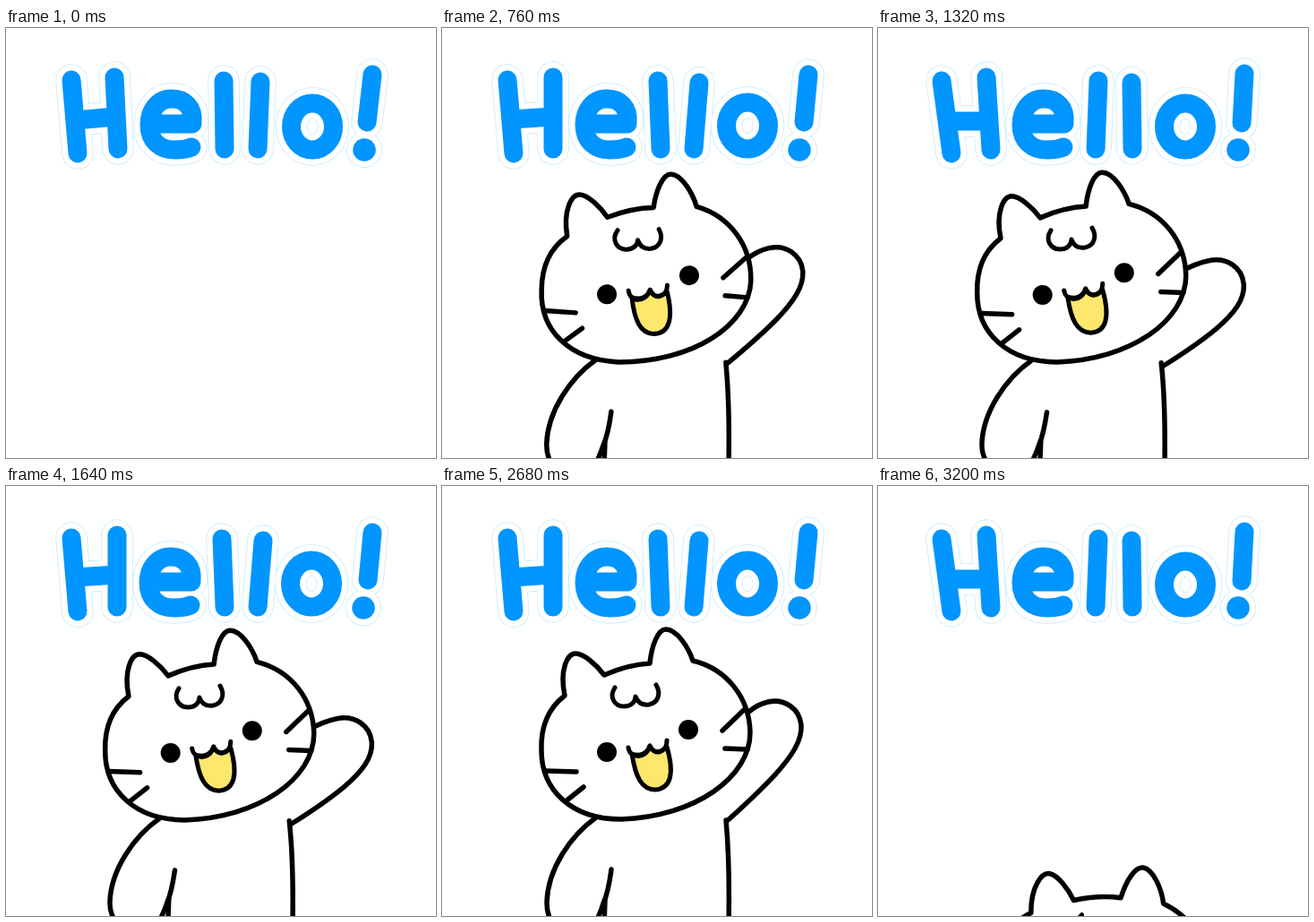
Write an HTML page with a canvas that moves like this. It is 480 px wide and 480 px high and loops after 3240 ms.

```html
<!DOCTYPE html>
<html lang="en">
<head>
<meta charset="utf-8">
<title>Hello</title>
<style>
html, body { margin: 0; height: 100%; overflow: hidden; background: #fff; }
canvas { display: block; }
</style>
</head>
<body>
<canvas id="stage" width="480" height="480" aria-label="A white cat waves hello"></canvas>
<script>
const ctx = document.getElementById('stage').getContext('2d');
const LOOP = 3240, BLUE = '#0095ff', MAX_TILT = 11.3;
ctx.lineCap = ctx.lineJoin = 'round';

// Three wobbling versions of the lettering
const lettering = [
  ['M73 58L80 140M121 55L125 135M78 103L122 99', 0, 'M243 59L244 135M284 60L281 135', 342, 110, 'M409 52L403 105', 400, 136],
  ['M73 58L80 140M124 55L124 135M78 102L123 99', -1, 'M241 59L244 135M287 61L281 135', 341, 109, 'M409 52L404 105', 399, 136],
  ['M71 59L82 140M121 55L126 136M77 104L124 104', 0, 'M246 59L243 135M283 61L284 135', 343, 110, 'M409 51L406 106', 402, 136]
].map(([h, ex, ll, ox, oy, bang, dotX, dotY]) => {
  const letters = new Path2D(h + ll + bang), dot = new Path2D(`M${dotX} ${dotY}h.01`);
  const e = new Path2D('M166 107L208 107C210 88 199 79 185 79C169 79 160 93 160 108C160 126 172 136 188 136C197 136 203 135 207 133');
  letters.addPath(e, { e: ex });
  letters.moveTo(ox + 23.5, oy);
  letters.ellipse(ox, oy, 23.5, 26, 0, 0, 7);
  return { letters, dot };
});

function drawText({ letters, dot }) {
  for (const [color, width] of [['#c8ebfd', 35.4], ['#fff', 33.8], [BLUE, 21]]) {
    ctx.strokeStyle = color;
    ctx.lineWidth = width;
    ctx.stroke(letters);
    ctx.lineWidth = width + 4.5;
    ctx.stroke(dot);
  }
}

// Blend the numbers of two paths with the same commands
function mix(a, b, p) {
  const to = b.match(/-?\d+/g);
  let i = 0;
  return a.replace(/-?\d+/g, n => +n + (to[i++] - n) * p);
}

function ink(path, fill, width = 5.5) {
  const shape = new Path2D(path);
  if (fill) {
    ctx.fillStyle = fill;
    ctx.fill(shape);
  }
  ctx.strokeStyle = '#000';
  ctx.lineWidth = width;
  ctx.stroke(shape);
}

function rotate(degrees, x, y) {
  ctx.translate(x, y);
  ctx.rotate(degrees * Math.PI / 180);
  ctx.translate(-x, -y);
}

function drawBody(wave) {
  const pose = (up, down, fill) => ink(mix(up, down, wave), fill);
  pose('M318 374C338 356 358 337 372 322C391 301 402 284 401 267C399 248 382 237 364 241C355 243 350 246 340 254',
       'M318 387C345 385 370 382 390 375C416 366 429 355 428 338C427 317 408 306 383 310C366 313 350 317 330 321', '#fff');
  pose('M317 373C320 405 321 440 320 490L121 484C118 478 117 473 117 465C118 427 144 390 172 370',
       'M314 376C319 405 320 440 320 490L121 484C115 478 113 473 113 465C114 432 140 394 170 374', '#fff');
  pose('M189 428C187 444 185 455 180 466C178 473 175 480 172 486',
       'M187 432C184 446 182 457 178 466C175 473 172 479 168 486');
  pose('M182 462L181 490', 'M181 460L180 490');
}

function drawHead(wave, tilt) {
  ctx.save();
  rotate(tilt, 182, 300);
  ctx.translate(-wave, wave * 4);
  rotate(wave * .9, 227, 285);
  ink('M137 234C131 205 140 187 149 187C158 187 172 199 181 211C197 204 215 199 232 198C234 178 241 160 250 160C262 160 275 180 280 195C317 204 343 235 344 275C344 325 283 369 200 372C145 372 111 340 111 295C110 267 120 247 137 234Z', '#fff');
  ink('M115 318L150 319M138 352L158 336M313 273L338 249M316 293L341 294');
  ink('M193 225C186 236 193 246 203 246C211 246 216 241 216 235C219 243 224 245 231 244C241 242 245 232 239 222', null, 5);
  ink('M212 299C216 325 223 339 238 339C255 338 260 322 251 291C243 299 236 298 232 290C229 299 221 302 212 299Z', '#fde76c', 5);
  ink('M208 292C210 305 228 305 232 290C236 301 251 299 251 284', null, 5);
  ctx.fillStyle = '#000';
  for (const [x, y] of [[184, 297], [275, 272]]) {
    ctx.beginPath();
    ctx.arc(x, y, 11, 0, 7);
    ctx.fill();
  }
  ctx.restore();
}

function drawCat(t) {
  if (t < 360) return;
  const step = Math.floor((t - 40) / 80);
  const entering = Math.max(0, 1 - (step * 80 - 280) / 480);
  const leaving = t >= 3160;
  const swing = .5 - .55 * Math.cos(Math.PI / 2 * (step - 1) + .43);
  const wave = leaving ? 0 : Math.min(1, swing + entering * .8);
  ctx.save();
  if (leaving) ctx.translate(20, 250);
  else ctx.translate(0, 300 * entering ** 4);
  drawBody(wave);
  drawHead(wave, leaving ? MAX_TILT : Math.min(MAX_TILT, 28 * entering));
  ctx.restore();
}

function draw() {
  const t = performance.now() % LOOP;
  ctx.fillStyle = '#fff';
  ctx.fillRect(0, 0, 480, 480);
  drawText(lettering[Math.floor(t / 160) % 3]);
  drawCat(t);
  requestAnimationFrame(draw);
}
draw();
</script>
</body>
</html>
```
